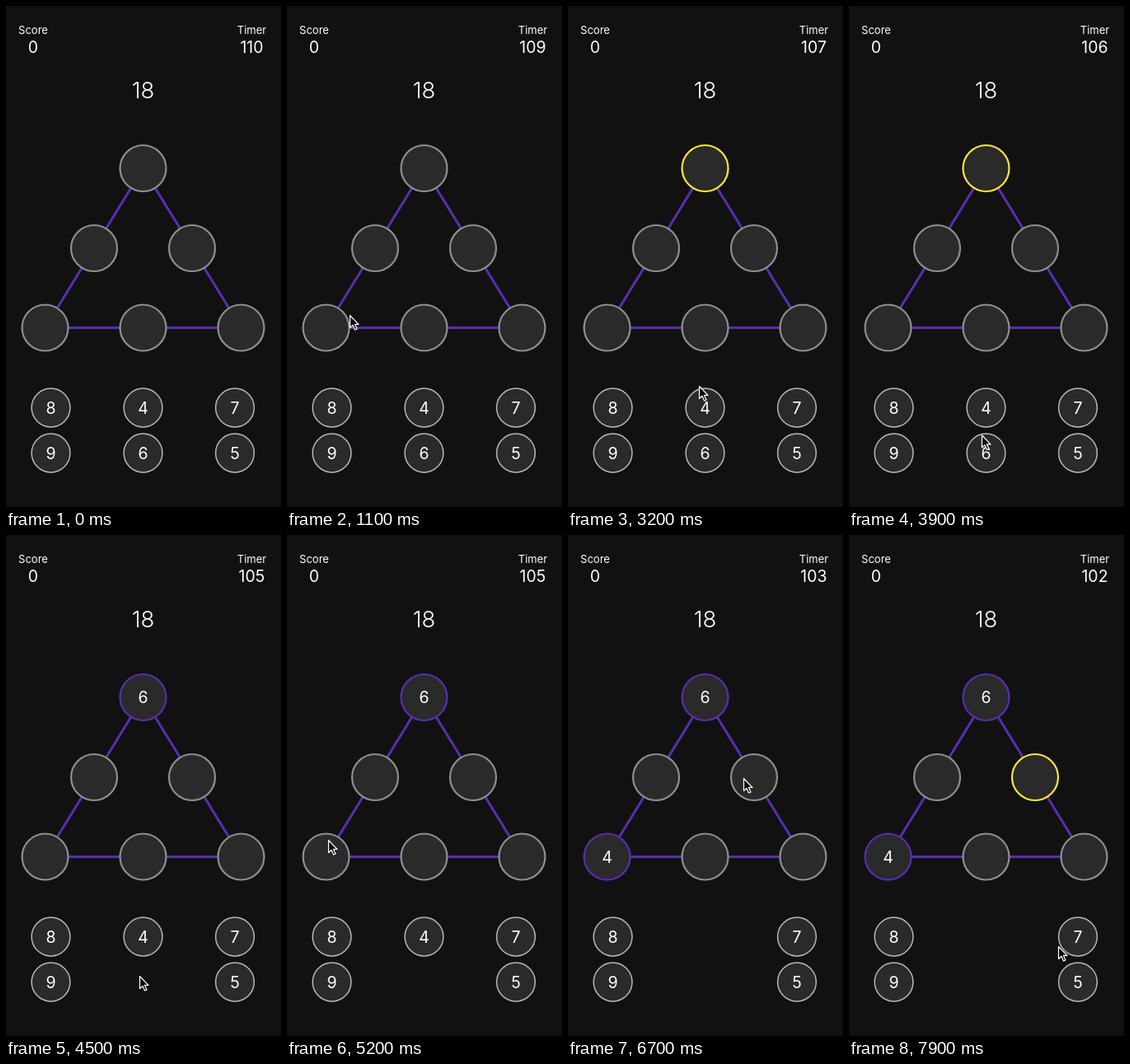
An HTML page that plays this animation: 334x608 px, repeating every 8000 ms.

```html
<!DOCTYPE html>
<html lang="en">
<head>
<meta charset="utf-8">
<title>Triangle sum puzzle</title>
<style>
  html, body { margin: 0; width: 100%; height: 100%; overflow: hidden; background: #111; }
  svg { display: block; width: 100%; height: 100%; }
  text { font: 400 19.5px Inter, "Open Sans", sans-serif; fill: #fff; text-anchor: middle; }
  .label { font-size: 13px; }
  .goal { font-size: 27.5px; font-weight: 300; }
  .edges { fill: none; stroke: #5a2db0; stroke-width: 3; }
  circle { fill: #2a2a2a; }
  .node circle { stroke: #8f8f8f; stroke-width: 2.2; }
  .node.active circle { stroke: #fee63c; }
  .node.filled circle { stroke: #5a2db0; }
  .key circle { stroke: #b8b8b8; stroke-width: 1.5; }
  .cursor { fill: #0a0a0a; stroke: #fff; stroke-width: 1.2; stroke-linejoin: round; }
</style>
</head>
<body>
<svg id="stage" viewBox="0 0 334 608">
  <text class="label" x="33" y="34">Score</text>
  <text x="33" y="57">0</text>
  <text class="label" x="298.5" y="34">Timer</text>
  <text id="timer" x="298.5" y="57">110</text>
  <text class="goal" x="166.5" y="112">18</text>
  <path class="edges" d="M166.5 197 47.5 390.5H285.5Z"/>
  <g id="board"></g>
  <path id="cursor" class="cursor" d="M.5 .5V15.5L4 12.3 6.5 18 9 16.9 6.5 11.4H11Z"/>
</svg>
<script>
const LOOP = 8000, STEP = 100;
const SVG = 'http://www.w3.org/2000/svg';
const board = document.getElementById('board');
const timer = document.getElementById('timer');
const cursor = document.getElementById('cursor');

function add(parent, tag, attrs) {
  const el = document.createElementNS(SVG, tag);
  for (const name in attrs) el.setAttribute(name, attrs[name]);
  return parent.appendChild(el);
}

function disc(kind, x, y, r, label = '') {
  const group = add(board, 'g', { class: kind });
  add(group, 'circle', { cx: x, cy: y, r });
  add(group, 'text', { x, y: y + 7 }).textContent = label;
  return group;
}

const nodes = [
  [166.5, 197], [107, 294], [226, 294],
  [47.5, 390.5], [166.5, 390.5], [285.5, 390.5]
].map(([x, y]) => disc('node', x, y, 28));

const keys = {};
[...'847965'].forEach((digit, i) => {
  keys[digit] = disc('key', [54.5, 166.5, 278][i % 3], i < 3 ? 487.5 : 542.5, 23.4, digit);
});

const moves = [
  { node: nodes[0], pick: 2200, place: 4400, digit: '6' },
  { node: nodes[3], pick: 5600, place: 6300, digit: '4' },
  { node: nodes[2], pick: 6900, place: Infinity }
];
const ticks = [600, 1600, 2600, 3500, 4500, 5500, 6500, 7600];

// time, x, y of the pointer tip
const path = [
  [500, 239, 327], [700, 257, 197], [800, 257, 197], [1100, 76, 375],
  [1500, 76, 375], [2300, 167, 210], [2400, 167, 211], [3200, 159, 461],
  [3300, 158, 479], [4200, 162, 535], [4600, 162, 535], [4800, 174, 400],
  [5000, 112, 231], [5200, 50, 370], [5300, 50, 370], [5700, 69, 400],
  [6200, 160, 491], [6300, 162, 486], [6700, 213, 295], [7100, 208, 300],
  [7500, 208, 300], [7900, 254, 499], [8000, 254, 499]
];

function pointer(t) {
  const i = Math.max(1, path.findIndex(p => p[0] >= t));
  const [t0, x0, y0] = path[i - 1], [t1, x1, y1] = path[i];
  const u = (t - t0) / (t1 - t0), k = u * u * (3 - 2 * u);
  return [x0 + (x1 - x0) * k, y0 + (y1 - y0) * k];
}

function render(t) {
  timer.textContent = 110 - ticks.filter(tick => t >= tick).length;
  for (const { node, pick, place, digit } of moves) {
    const placed = t >= place;
    node.setAttribute('class', 'node' + (placed ? ' filled' : t >= pick ? ' active' : ''));
    node.lastChild.textContent = placed ? digit : '';
    if (digit) keys[digit].style.visibility = placed ? 'hidden' : 'visible';
  }
  const shown = t >= path[0][0];
  cursor.style.visibility = shown ? 'visible' : 'hidden';
  if (shown) cursor.setAttribute('transform', `translate(${pointer(t)})`);
}

const start = performance.now();
function loop() {
  const t = (performance.now() - start) % LOOP;
  render(Math.floor(t / STEP) * STEP);
  requestAnimationFrame(loop);
}
loop();
</script>
</body>
</html>
```
